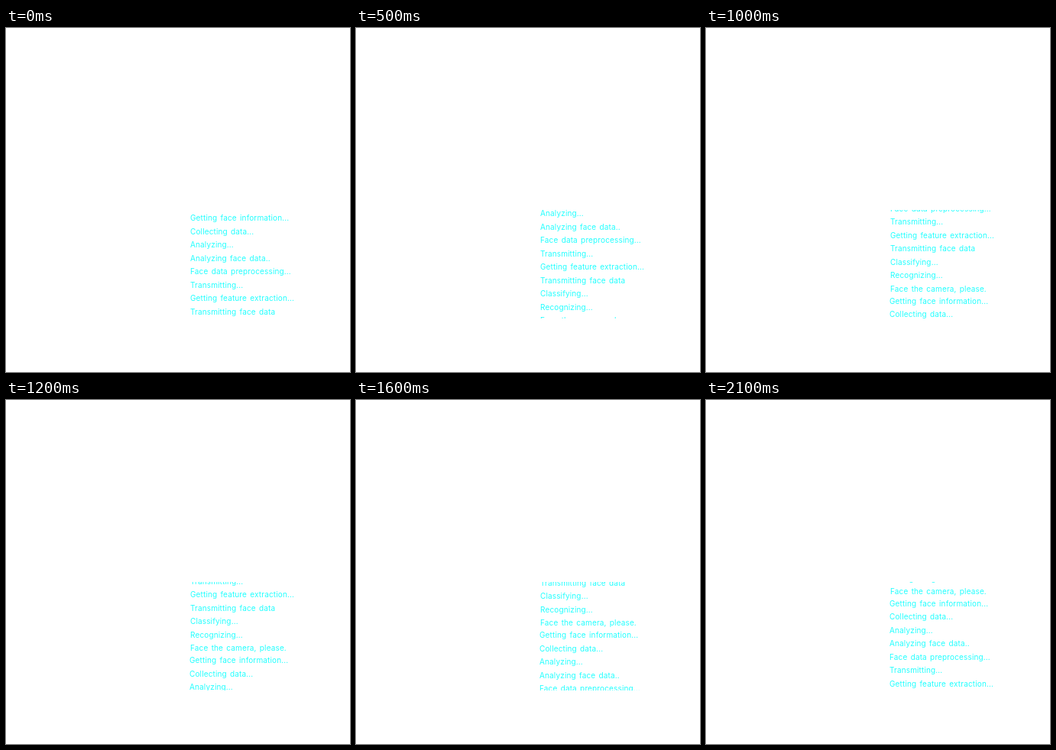
Animation, 450 px wide and 450 px high, one loop 2.2 s. Source, as an HTML page with a canvas:

```html
<!DOCTYPE html>
<html lang="en">
<head>
<meta charset="utf-8">
<style>
  html, body { margin: 0; width: 100%; height: 100%; overflow: hidden; background: #fff; }
  canvas { display: block; }
</style>
</head>
<body>
<canvas id="stage" width="450" height="450"></canvas>
<script>
const LOOP = 2200, TICK = 100, SPEED = 8.25, LINE = 17.5;
const lines = [
  'Getting face information...',
  'Collecting data...',
  'Analyzing...',
  'Analyzing face data..',
  'Face data preprocessing...',
  'Transmitting...',
  'Getting feature extraction...',
  'Transmitting face data',
  'Classifying...',
  'Recognizing...',
  'Face the camera, please.'
];

const ctx = document.getElementById('stage').getContext('2d');
ctx.font = '400 10px Inter, "Open Sans", sans-serif';
ctx.letterSpacing = '0.14px';
ctx.wordSpacing = '1.3px';

function drawList(x, y) {
  lines.forEach((text, i) => ctx.fillText(text, x, y + i * LINE));
}

function draw(ms) {
  const scroll = Math.floor(ms % LOOP / TICK) * SPEED;
  ctx.fillStyle = '#fff';
  ctx.fillRect(0, 0, 450, 450);
  ctx.save();
  ctx.beginPath();
  ctx.rect(230, 238, 160, 142);
  ctx.clip();
  ctx.fillStyle = '#2ff';
  drawList(241, 252.25 - scroll);
  // The second copy sits slightly left and closer than a full line.
  drawList(240, 443 - scroll);
  ctx.restore();
}

const start = performance.now();
function frame() {
  draw(performance.now() - start);
  requestAnimationFrame(frame);
}
frame();
</script>
</body>
</html>
```
